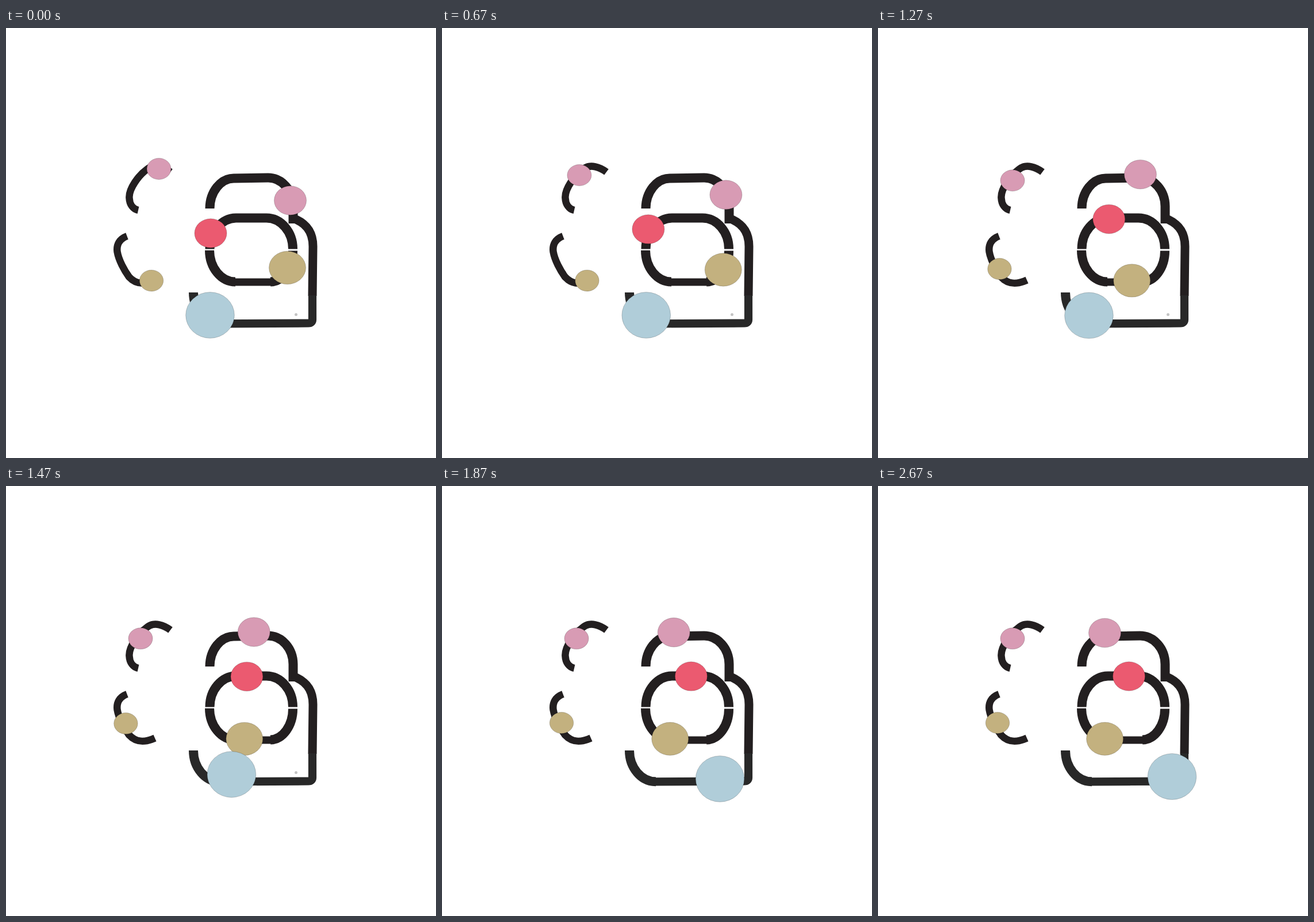
These frames come from a looping animation (748 px wide and 748 px high, 5010 ms). An HTML page:

```html
<!DOCTYPE html>
<html lang="en">
<head>
<meta charset="utf-8">
<title>Beads on tracks</title>
<style>
  html, body { margin: 0; width: 100%; height: 100%; overflow: hidden; background: #fff; }
  svg { display: block; width: 100vw; height: 100vh; }
  path { fill: none; stroke: #231f20; stroke-width: 16; }
  .small { stroke-width: 12.5; }
  .thin { stroke-width: 13; }
  .base { stroke: #282828; }
  .line { stroke-width: 14.2; }
</style>
</head>
<body>
<svg viewBox="0 0 748 748">
  <!-- loose arcs -->
  <path class="small" d="M286 250.5C276 243 258 235 245 246C231 256 213 280 214.5 296C215 307 221 315 230 317"/>
  <path class="small" d="M210.5 362C197 367 192 377 193.500 389C196 404 206 422 214 433C226 446 240 447 259 438.500"/>
  <!-- arch and its branch -->
  <path d="M354.500 314A42 53 0 0 1 396 261.500L456 260.500A43.500 50 0 0 1 499.500 310V340"/>
  <path d="M497 330C520 338 534 352 534 380L533 466" style="stroke-width:15"/>
  <!-- ring -->
  <path d="M354.500 384.500A46 54 0 0 1 400 330.500H453A46 54 0 0 1 499 384.500"/>
  <path d="M354 386.700A45 55 0 0 0 399 441.500M499 387.500A40 54 0 0 1 460 441.500"/>
  <path class="thin" d="M396 442H464"/>
  <!-- base -->
  <path class="base line" d="M533 465V507Q533 513.500 526 513.500L370 514.300"/>
  <path class="base" d="M326 460A46 54 0 0 0 372 514.300"/>
  <circle cx="504.500" cy="498.500" r="2.500" fill="#c4c4c4"/>
  <g id="beads" stroke="#0005" stroke-width=".6"></g>
</svg>
<script>
const LOOP = 5010, END = 2670;
const PINK = '#d89bb4', TAN = '#c3b17f', RED = '#eb5a70', BLUE = '#b0cdd9';

// mid: time halfway along the route; soft: how gently it speeds up and slows down (ms)
const beads = [
  { color: PINK, rx: 21, ry: 18.5, mid: 566, soft: 95, route: 'M266 245C252 240 238 253 234 265.3' },
  { color: TAN, rx: 20.7, ry: 18.5, mid: 1097, soft: 96, route: 'M253 439.5C232 437 215 431 208 412' },
  { color: PINK, rx: 28, ry: 25.3, mid: 1250, soft: 240, route: 'M494.5 300C494 260 474 253 432.5 254Q412 253.5 394.5 255.5' },
  { color: RED, rx: 28, ry: 25.3, mid: 1168, soft: 212, route: 'M356 357C359 345 370 337 381.5 335Q400 331.5 436.5 331' },
  { color: TAN, rx: 32, ry: 28.7, mid: 1228, soft: 165, route: 'M489.5 417C489 431 482 437.5 471 437.5Q440 440.5 394.6 439.7' },
  { color: BLUE, rx: 42.3, ry: 40, mid: 1645, soft: 150, route: 'M355 499.5Q393 501 481 509Q495 512 511.5 505.5' }
];

function make(tag, attrs) {
  const el = document.createElementNS('http://www.w3.org/2000/svg', tag);
  for (const name in attrs) el.setAttribute(name, attrs[name]);
  return el;
}

const group = document.getElementById('beads');
for (const bead of beads) {
  const { color, rx, ry, route } = bead;
  bead.dot = group.appendChild(make('ellipse', { rx, ry, fill: color }));
  bead.path = make('path', { d: route });
  bead.length = bead.path.getTotalLength();
}

// S-curve rescaled to run from 0 at the start to 1 at END
function progress(t, { mid, soft }) {
  const s = x => 1 / (1 + Math.exp((mid - x) / soft));
  return (s(Math.min(t, END)) - s(0)) / (s(END) - s(0));
}

function draw(now) {
  const t = now % LOOP;
  for (const bead of beads) {
    const { x, y } = bead.path.getPointAtLength(bead.length * progress(t, bead));
    bead.dot.setAttribute('cx', x);
    bead.dot.setAttribute('cy', y);
  }
}

let start;
function tick(now) {
  start ??= now;
  draw(now - start);
  requestAnimationFrame(tick);
}
draw(0);
requestAnimationFrame(tick);
</script>
</body>
</html>
```
